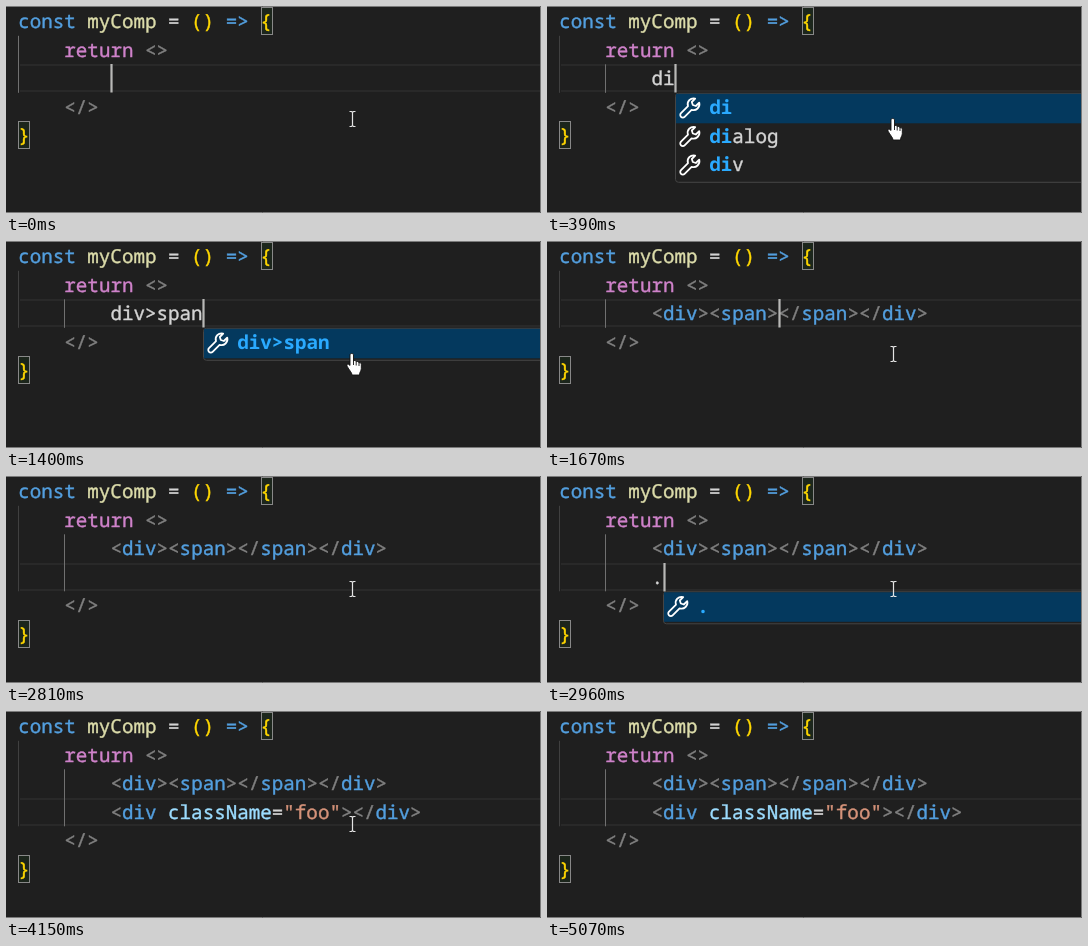
An HTML page that plays this animation: 535 by 207 pixels, repeating every 5090 ms.

```html
<!DOCTYPE html>
<html lang="en">
<head>
<meta charset="utf-8">
<title>Abbreviation expansion in a code editor</title>
<style>
  html, body { margin: 0; width: 100%; height: 100%; overflow: hidden; background: #1f1f1f; }
  svg { display: block; width: 535px; height: 207px; }
  text {
    font: 19.217px "Noto Sans Mono", "DejaVu Sans Mono", monospace;
    font-variant-ligatures: none;
    text-rendering: geometricPrecision;
    white-space: pre;
    stroke-width: .4px;
  }
  .match { font-weight: 600; stroke-width: 0; }
</style>
</head>
<body>
<svg id="stage" viewBox="0 0 535 207"></svg>
<script>
const LOOP = 5090;
const LEFT = 12.2, CHAR = 11.53, TOP = 1.3, ROW = 28.5, BASE = 21, RIGHT = 534;
const C = {
  key: '#539fdf', fn: '#dcdcaa', plain: '#d4d4d4', gold: '#ffd700', ret: '#cf82ca',
  tag: '#808080', attr: '#9cdcfe', str: '#d6937a', match: '#2aaaff'
};

const colX = col => LEFT + col * CHAR;
const rowY = row => TOP + row * ROW;
const escapeText = s => s.replace(/&/g, '&amp;').replace(/</g, '&lt;').replace(/>/g, '&gt;');
const rect = (x, y, w, h, fill, extra = '') =>
  `<rect x="${x}" y="${y}" width="${w}" height="${h}" fill="${fill}" ${extra}/>`;

// Tokens are [colour, text, class?] triples laid out one after another.
const write = (x, y, tokens) => `<text x="${x}" y="${y}">` + tokens.map(([color, s, cls = '']) =>
  `<tspan fill="${color}" stroke="${color}" class="${cls}">${escapeText(s)}</tspan>`).join('') + '</text>';
const line = (col, row, tokens) => write(colX(col), rowY(row) + BASE, tokens);

const open = name => [[C.tag, '<'], [C.key, name], [C.tag, '>']];
const close = name => [[C.tag, '</'], [C.key, name], [C.tag, '>']];
const plain = s => [[C.plain, s]];

const nested = [...open('div'), ...open('span'), ...close('span'), ...close('div')];
const classed = [
  [C.tag, '<'], [C.key, 'div'], [C.attr, ' className'], [C.plain, '='],
  [C.str, '"foo"'], [C.tag, '>'], ...close('div')
];

function bracketBox(col, row) {
  const x = Math.round(colX(col) + .25) + .5, y = Math.round(rowY(row)) + .5;
  return rect(x, y, 11, 27, '#17301766', 'stroke="#888" stroke-width="1"');
}

function guide(col, from, to, active) {
  return rect(Math.round(colX(col)), rowY(from), 1, (to - from) * ROW, active ? '#707070' : '#404040');
}

const wrench = (x, y) => `<path transform="translate(${x} ${y})" fill="none" stroke="#fff" stroke-width="1.8"
  stroke-linejoin="round" d="M16.2 1.8L12.8 5.2L13.8 8.2L16.8 9.2L20.2 5.8A5.9 5.9 0 0 1 12.6 13
  L5.6 20A2.5 2.5 0 0 1 2 16.4L9 9.4A5.9 5.9 0 0 1 16.2 1.8Z"/>`;

function popup(typed, items, row) {
  const x = Math.round(colX(8 + typed.length)), y = rowY(row + 1);
  const rows = items.map((item, i) => {
    const top = y + 1 + i * ROW;
    return (i ? '' : rect(x + 1, top, RIGHT - x, ROW + 1, '#04395e')) +
      wrench(x + 4, top + 3) +
      write(x + 34.3, top + BASE - .5, [[C.match, typed, 'match'], [C.plain, item.slice(typed.length)]]);
  });
  return rect(x + .5, y + .5, RIGHT - x + 10, ROW * items.length + 3.5, '#202020',
    'rx="3" stroke="#454545"') + rows.join('');
}

const pointers = {
  none: '',
  beam: `<path d="M343.5 105.5H345.5L346.5 106.5L347.5 105.5H349.5M346.5 106V120
    M343.5 120.5H345.5L346.5 119.5L347.5 120.5H349.5" fill="none" stroke="#e4e4e4" stroke-width="1.2"/>`,
  hand: `<g transform="translate(340 112)" stroke="#111" stroke-width=".9">
    <path fill="#fff" d="M4 2C4 0 7.5 0 7.5 2V8C8 7 10.2 7.3 10.2 8.8C11 8 13 8.3 13 10
      C14 9.3 15.3 10 15.3 11.5V15.5C15.3 18 13.5 19 13.5 22H6C6 19.5 3 17 1.3 13.5C.2 11 2 10.2 4 12.5Z"/>
    <path fill="none" d="M7.5 8V12M10.2 9V12.5M13 10V13"/></g>`
};

// Each step: start time, body lines, caret offset (null = blinked off), pointer, suggestions.
const steps = [];
const step = (at, body, caret, pointer, items) => steps.push({ at, body, caret, pointer, items });
const type = (at, typed, pointer, items = [typed], before = []) =>
  step(at, [...before, plain(typed)], typed.length, pointer, items);

step(0, [plain('')], 0, 'beam');
step(120, [plain('')], null, 'beam');
type(260, 'd', 'hand', ['d', 'dialog', 'div']);
type(390, 'di', 'hand', ['di', 'dialog', 'div']);
type(540, 'div', 'hand');
type(820, 'div>', 'hand');
type(1100, 'div>s', 'hand', ['div>s', 'div>samp', 'div>small', 'div>span']);
type(1250, 'div>sp', 'hand');
type(1400, 'div>span', 'hand');
step(1670, [nested], 11, 'beam');
step(2210, [nested], null, 'beam');
step(2350, [nested, plain('')], 0, 'beam');
step(2810, [nested, plain('')], null, 'beam');
['.', '.f', '.fo', '.foo'].forEach((s, i) => type(2960 + 150 * i, s, 'beam', [s], [nested]));
step(3720, [nested, classed], 21, 'beam');
step(4150, [nested, classed], null, 'beam');
step(4520, [nested, classed], null, 'none');
step(4670, [nested, classed], 21, 'none');
step(5070, [nested, classed], null, 'none');

function scene({ at, body, caret, pointer, items }) {
  const row = 1 + body.length, end = row + 1, inner = at >= 260;
  const y = Math.round(rowY(row));
  return [
    rect(14, y, RIGHT - 14, 2, '#292929'),
    rect(14, y + 26, RIGHT - 14, 2, '#292929'),
    guide(0, 1, end, !inner),
    inner ? guide(4, 2, end, true) : '',
    bracketBox(0, end + 1),
    ...body.map((tokens, i) => line(8, 2 + i, tokens)),
    line(4, end, [[C.tag, '</>']]),
    line(0, end + 1, [[C.gold, '}']]),
    items ? popup(items[0], items, row) : '',
    caret === null ? '' : rect(Math.round(colX(8 + caret) - .4) + .4, y, 2.2, 28.5, '#b8b8b6'),
    pointers[pointer]
  ].join('');
}

const header = bracketBox(21, 0) +
  line(0, 0, [[C.key, 'const '], [C.fn, 'myComp'], [C.plain, ' = '], [C.gold, '() '], [C.key, '=> '], [C.gold, '{']]) +
  line(4, 1, [[C.ret, 'return '], [C.tag, '<>']]);
const frame = '<path d="M0 .5H534.5V206.5H0" fill="none" stroke="#7a7a7a"/>';

const stage = document.getElementById('stage');
stage.innerHTML = rect(0, 0, 535, 207, '#1f1f1f') + header +
  steps.map((s, i) => `<g class="scene" opacity="${i ? 0 : 1}">${scene(s)}</g>`).join('') + frame;

// One keyframe per step, so no two keyframes share an offset.
stage.querySelectorAll('.scene').forEach((group, i) => {
  const frames = steps.map((s, k) => ({
    offset: s.at / LOOP, opacity: k === i ? 1 : 0, easing: 'step-end'
  }));
  frames.push({ offset: 1, opacity: 0 });
  group.animate(frames, { duration: LOOP, iterations: Infinity });
});
</script>
</body>
</html>
```
